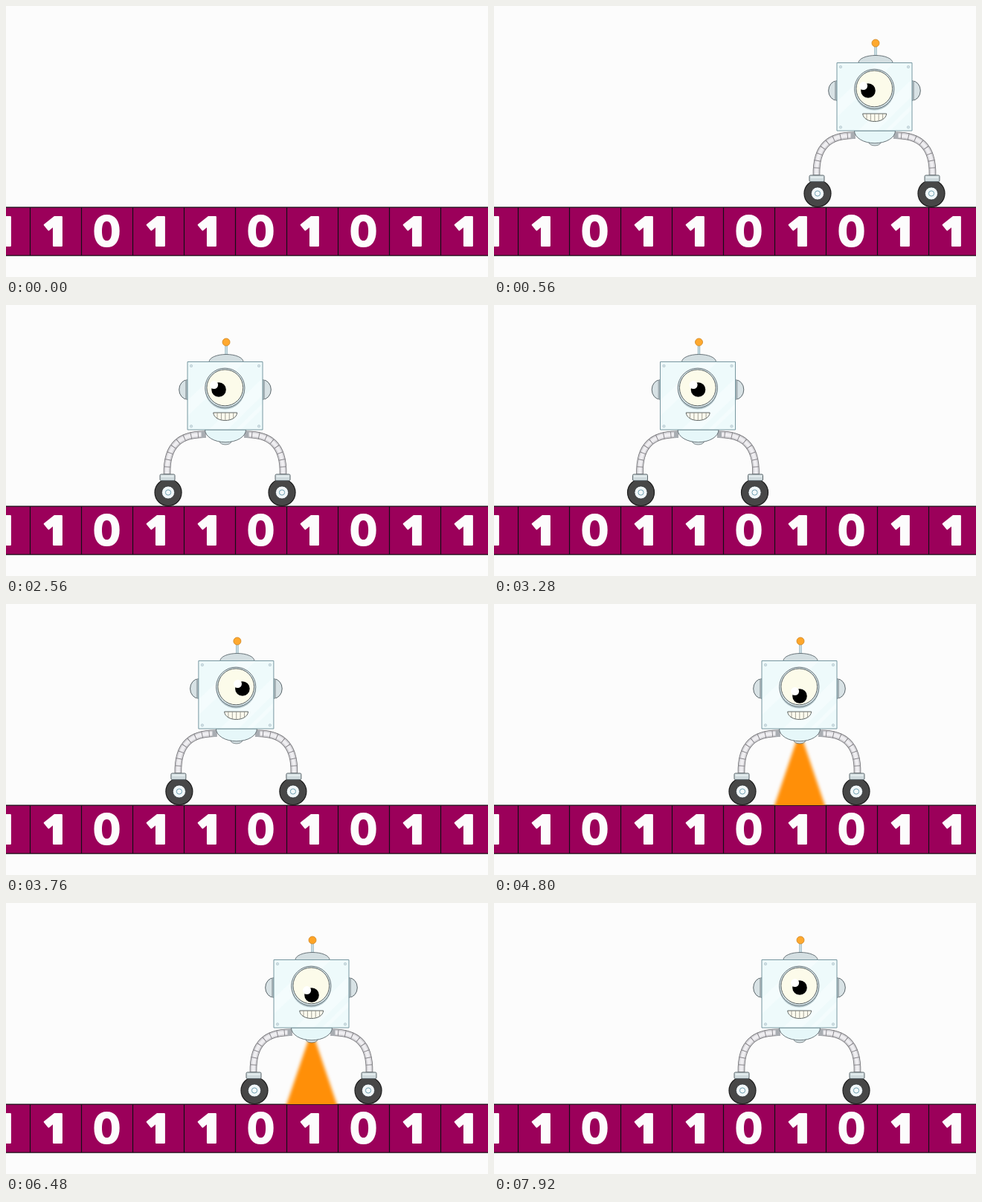
An HTML page with a canvas that plays this animation: 648x365 px, repeating every 8000 ms.

```html
<!DOCTYPE html>
<html lang="en">
<head>
<meta charset="utf-8">
<title>Robot on a binary tape</title>
<style>
html, body { margin: 0; width: 100%; height: 100%; overflow: hidden; background: #fcfcfc; }
canvas { display: block; }
</style>
</head>
<body>
<canvas id="stage" width="648" height="365"></canvas>
<script>
const ctx = document.getElementById('stage').getContext('2d');
const LOOP = 8000, STEP = 80;
const LINE = '#5b666b', BLUE = '#7fa6b2', STEEL = '#cfdadd', PALE = '#eefafb';
const TAPE = '1101101011', CELL = 69, FIRST = -36.5;
const FONTS = {
  0: '700 55px Inter, "Noto Sans", sans-serif',
  1: '800 55px "Open Sans", "Noto Sans", sans-serif'
};

const smooth = u => u * u * (3 - 2 * u);

// Eased value through [time, value] keys
function track(keys, t) {
  if (t <= keys[0][0]) return keys[0][1];
  for (let i = 1; i < keys.length; i++) {
    const [t0, a] = keys[i - 1], [t1, b] = keys[i];
    if (t < t1) return a + (b - a) * smooth((t - t0) / (t1 - t0));
  }
  return keys[keys.length - 1][1];
}

const STOPS = [[2000, 342.3], [2880, 274], [3440, 274], [4400, 410.5]];
const LOOK_X = [[800, -8.5], [1200, 0.5], [1760, 0.5], [2000, -8.5], [2600, -8.5], [2880, 0.5],
  [3300, 0.5], [3520, 8.5], [4160, 8.5], [4400, 0.5]];
const LOOK_Y = [[4400, 114], [4640, 124], [7360, 124], [7600, 114]];
const BEAM = [[4480, 0], [4720, 1], [7280, 1], [7520, 0]];

function robotX(t) {
  if (t < 1415) return 342.3 + 169.2 * ((1415 - t) / 855) ** 2;
  return track(STOPS, t);
}

function paint(fill, stroke, width = 1) {
  if (fill) { ctx.fillStyle = fill; ctx.fill(); }
  if (stroke) { ctx.strokeStyle = stroke; ctx.lineWidth = width; ctx.stroke(); }
}
function oval(x, y, rx, ry, fill, stroke, width, from = 0, to = Math.PI * 2) {
  ctx.beginPath();
  ctx.ellipse(x, y, rx, ry, 0, from, to);
  if (to - from < 6) ctx.closePath();
  paint(fill, stroke, width);
}
const disc = (x, y, r, fill, stroke, width) => oval(x, y, r, r, fill, stroke, width);
function box(x, y, w, h, fill, stroke, r = 0) {
  ctx.beginPath();
  ctx.roundRect(x, y, w, h, r);
  paint(fill, stroke);
}
function poly(points, fill) {
  ctx.beginPath();
  points.forEach(([x, y]) => ctx.lineTo(x, y));
  ctx.closePath();
  paint(fill);
}
function line(x0, y0, x1, y1, color, width) {
  ctx.beginPath();
  ctx.moveTo(x0, y0);
  ctx.lineTo(x1, y1);
  paint(null, color, width);
}

function drawTape() {
  ctx.fillStyle = '#9b005a';
  ctx.fillRect(0, 271, 648, 65);
  line(0, 271.1, 648, 271.1, '#151015', 1.2);
  line(0, 336.2, 648, 336.2, '#151015', 1.3);
  ctx.textAlign = 'left';
  ctx.lineJoin = 'round';
  [...TAPE].forEach((digit, i) => {
    const left = FIRST + i * CELL;
    line(left, 271, left, 336, '#151015', 1.2);
    ctx.font = FONTS[digit];
    const m = ctx.measureText(digit);
    const mid = left + CELL / 2 - (digit === '1' ? 3.5 : 0.5);
    const x = mid - (m.actualBoundingBoxRight - m.actualBoundingBoxLeft) / 2;
    ctx.fillStyle = ctx.strokeStyle = '#fcfcfc';
    ctx.lineWidth = 2.2;
    ctx.fillText(digit, x, 322.8);
    ctx.strokeText(digit, x, 322.8);
  });
}

function drawBeam(power) {
  if (power <= 0) return;
  ctx.save();
  ctx.beginPath();
  ctx.rect(-50, 186, 100, 85);
  ctx.clip();
  ctx.globalAlpha = power;
  ctx.filter = 'blur(2.2px)';
  poly([[-2.5, 180], [3.5, 180], [36, 276], [-35, 276]], '#ff8f08');
  ctx.restore();
}

function tube(color, width, dash = []) {
  ctx.beginPath();
  ctx.moveTo(-26, 174.3);
  ctx.bezierCurveTo(-60, 173.5, -79, 188, -78, 228);
  ctx.setLineDash(dash);
  paint(null, color, width);
  ctx.setLineDash([]);
}
function drawLeg(side) {
  ctx.save();
  ctx.scale(side, 1);
  tube('#6c6c70', 9.6);
  tube('#d3d2d6', 8);
  tube('#efeef1', 4.4);
  tube('#8b898e', 8.6, [1, 8.6]);
  box(-32, 170, 6, 9, '#a9adb2');
  disc(-76.5, 252.5, 18, '#474747', '#1c1c1c', 1.2);
  disc(-76.5, 252.5, 8.6, '#f1f7f9', '#33383b', 0.8);
  disc(-76.5, 252.5, 3.6, '#f4fafb', '#6f9fb0', 1);
  box(-87.5, 228, 20, 8.5, STEEL, LINE, 1.5);
  box(-86, 229.5, 17, 2.5, '#e2ebed');
  ctx.restore();
}

function drawEar(side) {
  ctx.save();
  ctx.scale(side, 1);
  oval(-50.5, 114, 11.3, 13.2, '#d8e2e5', LINE, 1, Math.PI / 2, Math.PI * 1.5);
  box(-53.5, 101.5, 3, 25, '#a3afb4');
  ctx.restore();
}

function drawMouth() {
  ctx.save();
  ctx.beginPath();
  ctx.moveTo(-15.8, 145);
  ctx.lineTo(16.2, 145);
  ctx.bezierCurveTo(15, 159, -14.6, 159, -15.8, 145);
  ctx.closePath();
  paint('#fdfbee', '#5f6564', 1);
  ctx.clip();
  for (let x = -10.5; x < 15; x += 5.4) line(x, 145, x, 156, '#8b8b85', 0.8);
  ctx.restore();
}

function drawEye(dx, y) {
  disc(-0.2, 114, 26.6, '#b0c3c9');
  disc(-0.2, 111.7, 26.6, '#dcebef', LINE, 0.9);
  disc(-0.2, 111.4, 24.4, '#fcfbea', '#555d5f', 1);
  disc(dx, y, 9.8, '#000');
  disc(dx - 6.4, y - 6.4, 5.5, '#fff');
}

function drawBody(power, t) {
  oval(0.5, 183.5, 8, 4.5, '#dbe7ea', LINE, 0.8);
  oval(0.5, 168, 27.5, 16.8, '#e6f7f9', LINE, 0.9, 0, Math.PI);
  drawEar(-1);
  drawEar(1);

  line(1.5, 54, 1.5, 68, BLUE, 3.2);
  line(1.5, 54, 1.5, 68, '#e4f0f3', 1.4);
  oval(1.5, 76.5, 23, 10, '#d4dfe2', LINE, 0.9, Math.PI, Math.PI * 2);
  const glow = power * (0.5 + 0.5 * Math.sin(t / 130));
  disc(1.5, 50, 5, '#ffa92f', '#cf8420', 0.8);
  if (glow > 0) disc(1.5, 50, 4.4, `rgba(255,140,0,${0.6 * glow})`);

  box(-50.5, 76.5, 101, 91.5, PALE);
  ctx.save();
  ctx.clip();
  poly([[-50, 128], [4, 77], [26, 77], [-50, 149]], '#f4fcfd');
  poly([[-22, 168], [50, 99], [50, 122], [3, 168]], '#f4fcfd');
  poly([[14, 168], [50, 133], [50, 140], [21, 168]], '#f4fcfd');
  ctx.restore();
  box(-50.5, 76.5, 101, 91.5, null, '#7797a0');
  for (const x of [-45.5, 45.5])
    for (const y of [82, 163.3]) disc(x, y, 1.7, '#d2e1e6', '#a9bfc7', 0.6);
}

function draw(t) {
  ctx.fillStyle = '#fcfcfc';
  ctx.fillRect(0, 0, 648, 365);
  drawTape();
  if (t < 160) return;
  const power = track(BEAM, t);
  ctx.save();
  ctx.translate(robotX(t), 0);
  drawBeam(power);
  drawLeg(1);
  drawLeg(-1);
  drawBody(power, t);
  drawEye(track(LOOK_X, t), track(LOOK_Y, t));
  drawMouth();
  ctx.restore();
}

const start = performance.now();
function tick() {
  const t = (performance.now() - start) % LOOP;
  draw(Math.floor(t / STEP) * STEP);
  requestAnimationFrame(tick);
}
tick();
</script>
</body>
</html>
```
